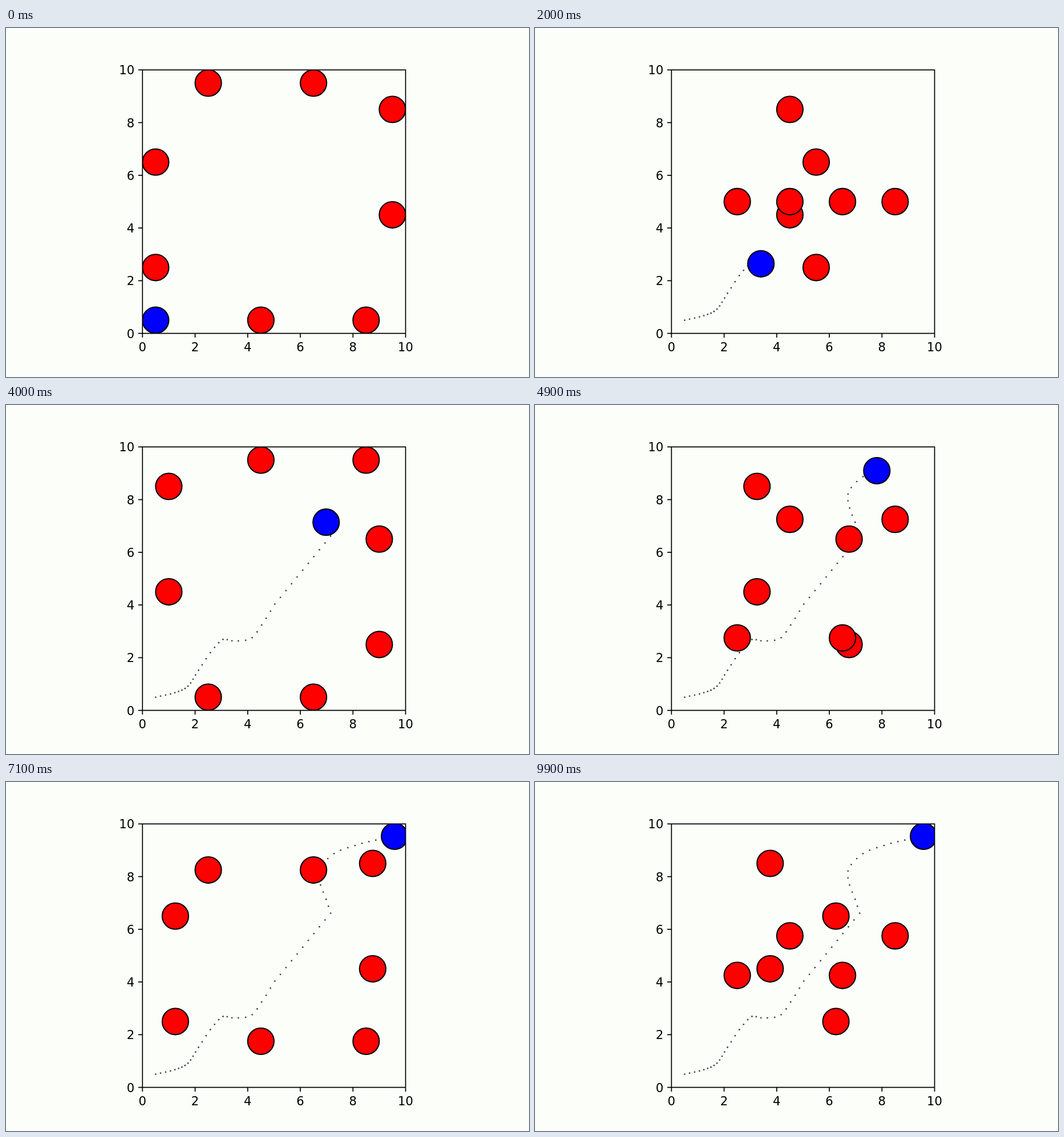
These frames come from a looping animation (917 by 611 pixels, 10000 ms). An HTML page with a canvas:

```html
<!DOCTYPE html>
<html lang="en">
<head>
<meta charset="utf-8">
<title>Moving obstacles</title>
<style>
  html, body { margin: 0; width: 100%; height: 100%; overflow: hidden; background: #fcfefa; }
  canvas, svg { position: absolute; left: 0; top: 0; width: 917px; height: 611px; }
  svg { font: 21.2px "DejaVu Sans", sans-serif; }
</style>
</head>
<body>
<canvas id="stage" width="917" height="611"></canvas>
<svg id="axes" viewBox="0 0 917 611"></svg>
<script>
const LEFT = 239.3, TOP = 73.3, BOTTOM = 534.6, UNIT = 46.13;
const SIDE = UNIT * 10, RADIUS = UNIT / 2;
const STEP = 100, STEPS = 100;
const px = x => LEFT + x * UNIT;
const py = y => BOTTOM - y * UNIT;
const ctx = document.getElementById('stage').getContext('2d');

// Robot route in plot units: a bend, a straight run, a second bend.
// Each key point is [step, x, y].
const runStart = [28, 5.03, 4.03], runEnd = [38, 7.15, 6.61];
const near = [55, 9.39, 9.5], rest = [60, 9.58, 9.53];
const legs = [
  [[0, 0.5, 0.5], [4, 1.23, 0.67], [8, 1.73, 0.92], [12, 2.13, 1.52], [16, 2.74, 2.39],
   [18, 3.06, 2.69], [20, 3.4, 2.64], [23, 4.17, 2.76], [25, 4.53, 3.24], runStart],
  [runStart, runEnd],
  [runEnd, [40, 6.98, 7.14], [42, 6.77, 7.68], [44, 6.71, 8.21], [47, 7.28, 8.87],
   [50, 8.08, 9.18], near]
];

const slope = (a, b, axis) => (b[axis] - a[axis]) / (b[0] - a[0]);

// Velocity at a key point, one-sided at the ends of a leg
function tangent(leg, i, axis) {
  const a = leg[i - 1], p = leg[i], b = leg[i + 1];
  if (!a) return slope(p, b, axis);
  if (!b) return slope(a, p, axis);
  const w = (p[0] - a[0]) / (b[0] - a[0]);
  return slope(a, p, axis) * (1 - w) + slope(p, b, axis) * w;
}

// Cubic Hermite curve through the key points of a leg
function spline(leg, k, axis) {
  const i = Math.max(1, leg.findIndex(p => p[0] >= k));
  const a = leg[i - 1], b = leg[i];
  const h = b[0] - a[0], u = (k - a[0]) / h, v = 1 - u;
  return a[axis] * v * v * (1 + 2 * u) + b[axis] * u * u * (1 + 2 * v) +
    h * u * v * (v * tangent(leg, i - 1, axis) - u * tangent(leg, i, axis));
}

// At the goal the robot hops between two spots, then stays
function robotAt(k) {
  const leg = legs.find(l => k <= l[l.length - 1][0]);
  const [x, y] = leg
    ? [spline(leg, k, 1), spline(leg, k, 2)]
    : (k < rest[0] && k % 2 ? near : rest).slice(1);
  return [px(x), py(y)];
}

// Bounce between 0.25 and 9.75, a quarter unit per step
const bounce = n => 9.75 - Math.abs(38 - (n + 76) % 76) * 0.25;

function circle(x, y, r, color) {
  ctx.beginPath();
  ctx.arc(x, y, r, 0, Math.PI * 2);
  ctx.fillStyle = color;
  ctx.fill();
}

function disc(x, y, color) {
  circle(x, y, RADIUS, color);
  ctx.stroke();
}

function draw(k) {
  ctx.clearRect(0, 0, 917, 611);
  ctx.save();
  ctx.beginPath();
  ctx.rect(LEFT, TOP, SIDE, SIDE);
  ctx.clip();

  for (let i = 0; i <= k; i++) circle(...robotAt(i), 1.4, '#444');

  ctx.strokeStyle = '#000';
  ctx.lineWidth = 2.1;
  const across = bounce(k + 1), up = bounce(k - 1);
  for (const lane of [2.5, 6.5]) {
    disc(px(across), py(lane), '#f00');
    disc(px(10 - across), py(lane + 2), '#f00');
    disc(px(lane), py(10 - up), '#f00');
    disc(px(lane + 2), py(up), '#f00');
  }
  disc(...robotAt(k), '#00f');
  ctx.restore();
}

function buildAxes() {
  let path = `M${LEFT} ${TOP}h${SIDE}v${SIDE}h${-SIDE}z`;
  let labels = '';
  for (let v = 0; v <= 10; v += 2) {
    path += `M${px(v)} ${BOTTOM}v7.4M${LEFT} ${py(v)}h-7.4`;
    labels += `<text x="${px(v)}" y="566" text-anchor="middle">${v}</text>` +
      `<text x="225.3" y="${py(v) + 8}" text-anchor="end">${v}</text>`;
  }
  document.getElementById('axes').innerHTML =
    `<path d="${path}" fill="none" stroke="#000" stroke-width="1.7"/>${labels}`;
}

let shown = -1;
const start = performance.now();
function tick() {
  const k = Math.floor((performance.now() - start) / STEP) % STEPS;
  if (k !== shown) draw(shown = k);
  requestAnimationFrame(tick);
}

buildAxes();
tick();
</script>
</body>
</html>
```
